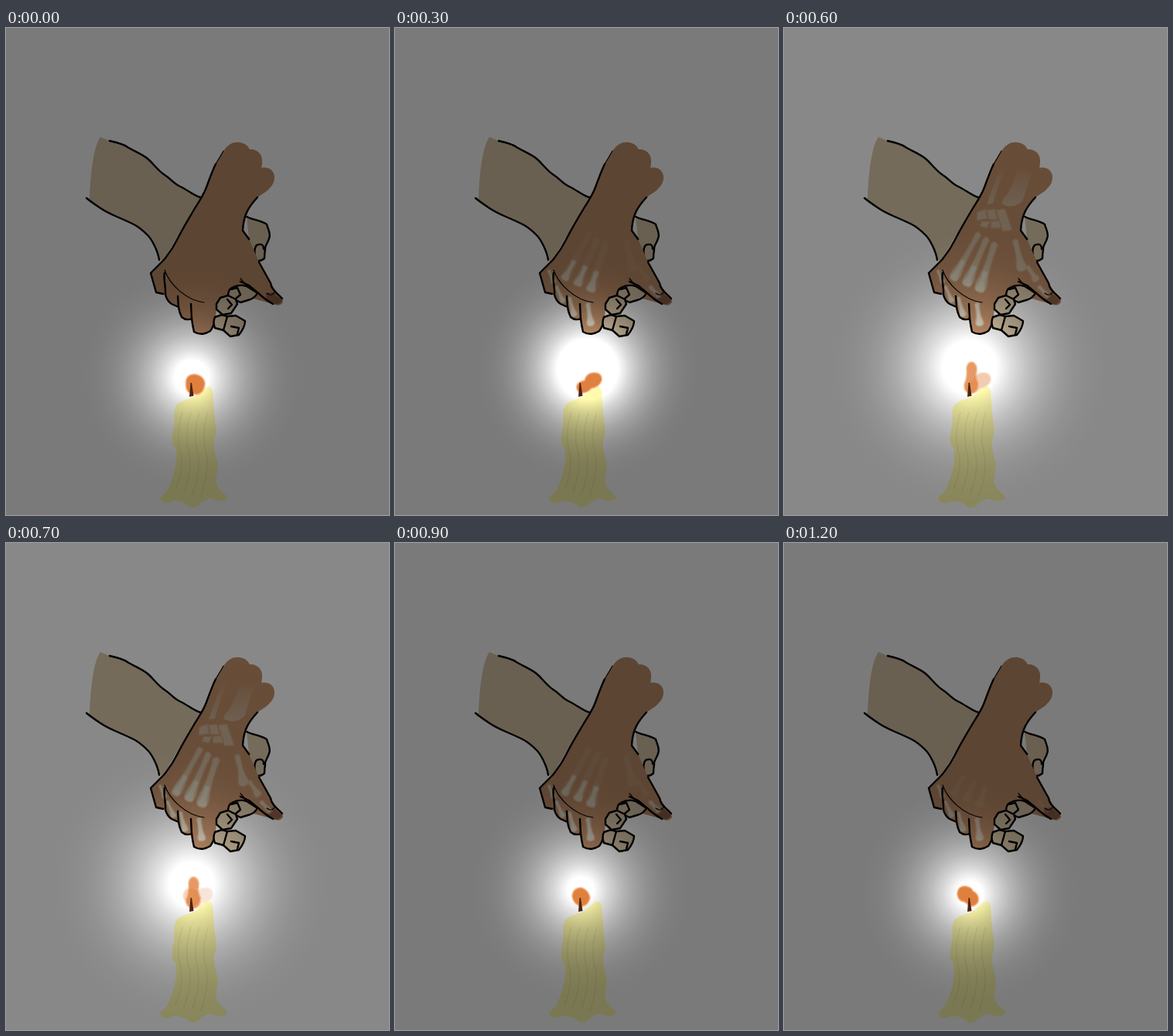
Animation of 495x630 px, one loop 1300 ms. Source, as an HTML page:

```html
<!DOCTYPE html>
<html lang="en">
<head>
<meta charset="utf-8">
<title>Hands over a candle</title>
<style>
  html, body { margin: 0; width: 100%; height: 100%; overflow: hidden; background: #fff; }
  svg { display: block; }
  path { stroke-linecap: round; stroke-linejoin: round; }
  .ink { fill: none; stroke: #000; stroke-width: 2.4; }
  .thin { stroke-width: 1.2; }
  .pale { fill: #dbc8a9; }
  .brown { fill: #c2906a; }
  .nail { fill: #8e6046; }
  .wax { fill: #fffaac; }
  .drips { fill: none; stroke: #8f8848; stroke-opacity: .12; stroke-width: 1.5; }
  .bone { fill: #dfe1cd; stroke: #ecd9bd; stroke-opacity: .4; stroke-width: 3; }
  .bright { fill: #eef4e8; }
  .faded { fill: url(#fade); }
  .flame { fill: #e0803e; stroke: #f3a873; stroke-opacity: .5; stroke-width: 2.5; }
  .wick { fill: #4b2410; }
</style>
</head>
<body>
<svg id="stage" width="495" height="630" viewBox="0 0 495 630">
  <defs>
    <radialGradient id="glow" gradientUnits="userSpaceOnUse"></radialGradient>
    <linearGradient id="fade" gradientUnits="userSpaceOnUse" x1="0" y1="178" x2="0" y2="228">
      <stop offset="0" stop-color="#dfe1cd" stop-opacity="0"/>
      <stop offset="1" stop-color="#dfe1cd" stop-opacity=".85"/>
    </linearGradient>
  </defs>
</svg>
<script>
const stage = document.getElementById('stage'), glow = document.getElementById('glow');

function add(parent, tag, attrs = {}) {
  const el = document.createElementNS('http://www.w3.org/2000/svg', tag);
  for (const name in attrs) el.setAttribute(name, attrs[name]);
  parent.append(el);
  return el;
}
const shape = (cls, d, parent = stage) => add(parent, 'path', { class: cls, d });

// Rises from 0 to 1 between a and b, falls back between c and d.
const swell = (s, a, b, c, d) => Math.max(0, Math.min(1, (s - a) / (b - a), (d - s) / (d - c)));
const wave = (s, peak) => Math.cos(2 * Math.PI * (s - peak) / 13);

// Parts that fade in and out: a group, its strength and its swell times.
const fading = [];
function fader(strength, ...times) {
  const g = add(stage, 'g');
  fading.push({ g, strength, times });
  return g;
}

// A bone from (x, y) to (u, v), wider at the far end.
function bone(parent, x, y, u, v, w, cls = 'bone') {
  const n = Math.hypot(u - x, v - y), turn = Math.atan2(v - y, u - x) * 180 / Math.PI;
  shape(cls, `M0 ${-w * .3}Q${n * .4} ${-w * .15} ${n * .7} ${-w * .4}Q${n} ${-w * .8} ${n} 0Q${n} ${w * .8} ${n * .7} ${w * .4}Q${n * .4} ${w * .15} 0 ${w * .3}Q${-w * .4} 0 0 ${-w * .3}Z`, parent)
    .setAttribute('transform', `translate(${x} ${y}) rotate(${turn})`);
}

add(stage, 'rect', { width: 495, height: 630, fill: '#fff' });

// Candle
shape('wax', 'M220 488C225 482 236 480 243 477C250 473 257 462 264 464C269 468 267 480 269 495C270 510 273 520 271 528C267 535 269 548 273 560C276 572 270 578 272 590C276 600 284 602 286 607C284 613 276 612 270 611C262 606 258 612 252 614C248 620 243 621 238 620C232 614 226 612 216 612C208 617 200 614 199 608C204 603 210 598 212 590C218 575 222 560 219 543C213 540 214 530 217 515C218 505 216 495 220 488Z');
for (let i = 0; i < 4; i++) {
  const x = 228 + i * 11;
  shape('drips', `M${x} 497q-9 28-3 50t-6 ${50 + i * 3}`);
}

// Pale arm and thumb
const armTop = '134 146C144 148 151 150 157 154S176 163 183 169S197 185 205 190S216 201 225 205S243 217 251 219';
const armBottom = '198 300C196 287 188 273 183 268S171 257 165 254S150 247 143 244S128 237 122 233S110 225 104 220';
shape('pale', `M122 141L${armTop}L203 301L${armBottom}L108 220C109 195 112 155 122 141Z`);
shape('ink', `M${armTop}M${armBottom}`);
shape('pale ink', 'M311 244C318 248 330 249 337 254C338 259 343 266 340 272C339 278 334 281 335 287Q334 292 334 298Q326 305 318 297Q312 286 314 273').style.fill = '#dbc8a9';
shape('ink', 'M323 299C320 290 321 280 327 280Q333 279 333 286');

// Brown hand: its edges serve for both the fill and the ink
const wrist = '271 176C267 184 263 195 259 206S249 225 243 235S228 260 221 274S211 291 204 300';
const pinky = '203 301L187 317L194 342L203 344';
const knuckles = '206 345Q208 353 214 357L223 361Q224 368 227 374Q233 379 240 376Q241 384 243 393Q253 399 264 392Q268 387 271 375';
const thumb = '345 357Q336 352 326 343L314 333L303 328';
const back = '357 350C349 342 343 338 342 330L327 303';
const side = '314 273L306 262C307 241 314 231 325 219';
shape('brown', `M282 158L${wrist}L${pinky}L${knuckles}L272 362L291 342L${thumb}L${thumb.split('Q')[0]}Q355 361 358 354L${back}L${side}L337 211C342 206 347 202 347 193C347 185 340 179 330 181Q331 178 331 171C331 163 324 156 315 157Q311 149 302 148C295 147 287 150 282 158Z`);
shape('brown', 'M303 328L326 343L345 357Q355 361 358 354L342 330L327 303Z');
shape('nail', 'M336 343L345 342L357 352Q354 359 346 357Q339 354 336 348Z');

// Bones
const fingers = fader(.75, 0, 3, 11, 16);
const heads = fader(.6, 0, 3, 9, 12.6);
const palm = fader(.55, 2.5, 5, 8, 9.3);
const carpus = fader(.5, 3, 5, 8, 9);
for (let i = 0; i < 4; i++) {
  const x = 199 + 6 * i + 3.6 * i * i, y = 314 + 24 * i - 3.2 * i * i;
  bone(fingers, x, y, x + 9 - 2.5 * Math.abs(i - 1), y + 16 + 4 * i, 5 + 1.3 * i, 'bone bright');
}
for (let i = 0; i < 3; i++) {
  const x = 251 + 10.5 * i, y = 267 + 6.5 * i, u = 218 + 17 * i, v = 326 + 7.5 * i;
  bone(palm, x, y, u, v, 11 + i);
  bone(heads, x + (u - x) * .6, y + (v - y) * .6, u, v, 9 + i, 'bone bright');
}
bone(heads, 330, 335, 342, 348, 7, 'bone bright');
bone(palm, 299, 276, 308, 314, 11);
bone(palm, 315, 309, 327, 327, 8);
shape('bone', 'M250 239L260 235L262 246L250 248ZM263 236L272 235L275 247L265 247ZM275 236L285 235L294 261L283 262ZM256 251L265 251L262 258L254 256ZM268 251L278 250L280 258L268 258Z', carpus);
shape('faded', 'M302 180L320 187Q313 210 308 224Q296 235 282 228Q280 224 288 216Q296 204 302 180ZM280 180L287 180Q276 204 270 227L262 228Q270 204 280 180Z', carpus);

// Ink of the brown hand
shape('ink', `M${wrist}M${pinky}M${knuckles}M${thumb}M${back}M${side}`);
shape('ink', 'M205 317C203 327 207 333 206 345M222 347L223 361M239 357L240 376');
shape('ink thin', 'M281 159L271 176M205 313C211 331 232 352 256 355M337 343Q343 348 347 342M303 324L309 331');

// Pale fingers
for (const d of [
  'M287 347Q287 338 292 336Q301 331 311 334L325 343Q321 350 313 352L303 355Z',
  'M286 373L297 372L309 379Q309 387 301 397L290 399L281 391Q279 382 286 373Z',
  'M281 391L270 388Q267 381 270 374L279 371L286 373Z',
  'M272 357L277 349L287 346L297 351L299 357L291 369L280 371L272 364Z'
]) shape('ink', d).style.fill = '#dbc8a9';
shape('ink', 'M291 338L299 336L303 345L297 350M286 351L292 358L287 363M291 386L301 388L299 396');

// Darkness with a hole of light
add(stage, 'rect', { width: 495, height: 630, fill: 'url(#glow)' });
const rings = Array.from({ length: 9 }, (_, i) => ({ u: i / 8, el: add(glow, 'stop') }));

// Flame poses, each melting into the next
const flame = (d, ...times) => shape('flame', d, fader(...times));
flame('M233 455Q235 448 244 448Q256 450 257 460Q256 472 247 474Q235 474 233 466Q232 460 233 455Z', 1, -1, 0, 0, 3);
flame('M235 463Q236 458 245 456Q247 447 257 446Q268 446 267 456Q264 464 254 466Q249 472 241 472Q234 470 235 463Z', 1, 0, 3, 3, 8);
flame('M236 440Q237 432 243 432Q250 434 249 444Q247 451 251 460Q251 472 241 473Q232 471 233 461Q237 452 236 440Z', .8, 3, 5.5, 7, 9);
flame('M229 457Q230 446 241 446Q250 449 252 459Q250 469 241 470Q231 468 229 457Z', 1, 6, 9, 9, 12);
flame('M224 453Q225 444 234 444Q242 445 244 450Q253 455 251 464Q246 472 239 469Q235 464 229 463Q224 460 224 453Z', 1, 9, 12, 12, 13);
shape('wick', 'M238.5 459L240 459L242.5 476L237 477Z');

function draw(step) {
  const lit = step >= 4 && step <= 8;
  const dark = lit ? .467 : .522, radius = lit ? 195 : 155;
  const core = 27 + 14 * wave(step, 4);
  glow.setAttribute('cx', 240 + 9 * swell(step, 0, 3, 3, 6));
  glow.setAttribute('cy', 446 - 8 * wave(step, 5));
  glow.setAttribute('r', radius);
  for (const { u, el } of rings) {
    el.setAttribute('offset', (core + (radius - core) * u) / radius);
    el.setAttribute('stop-opacity', dark * (1 - (1 - u) ** 2.6));
  }
  for (const { g, strength, times } of fading) g.setAttribute('opacity', strength * swell(step, ...times));
}

const start = performance.now();
function tick() {
  draw(Math.floor((performance.now() - start) % 1300 / 100));
  requestAnimationFrame(tick);
}
tick();
</script>
</body>
</html>
```
